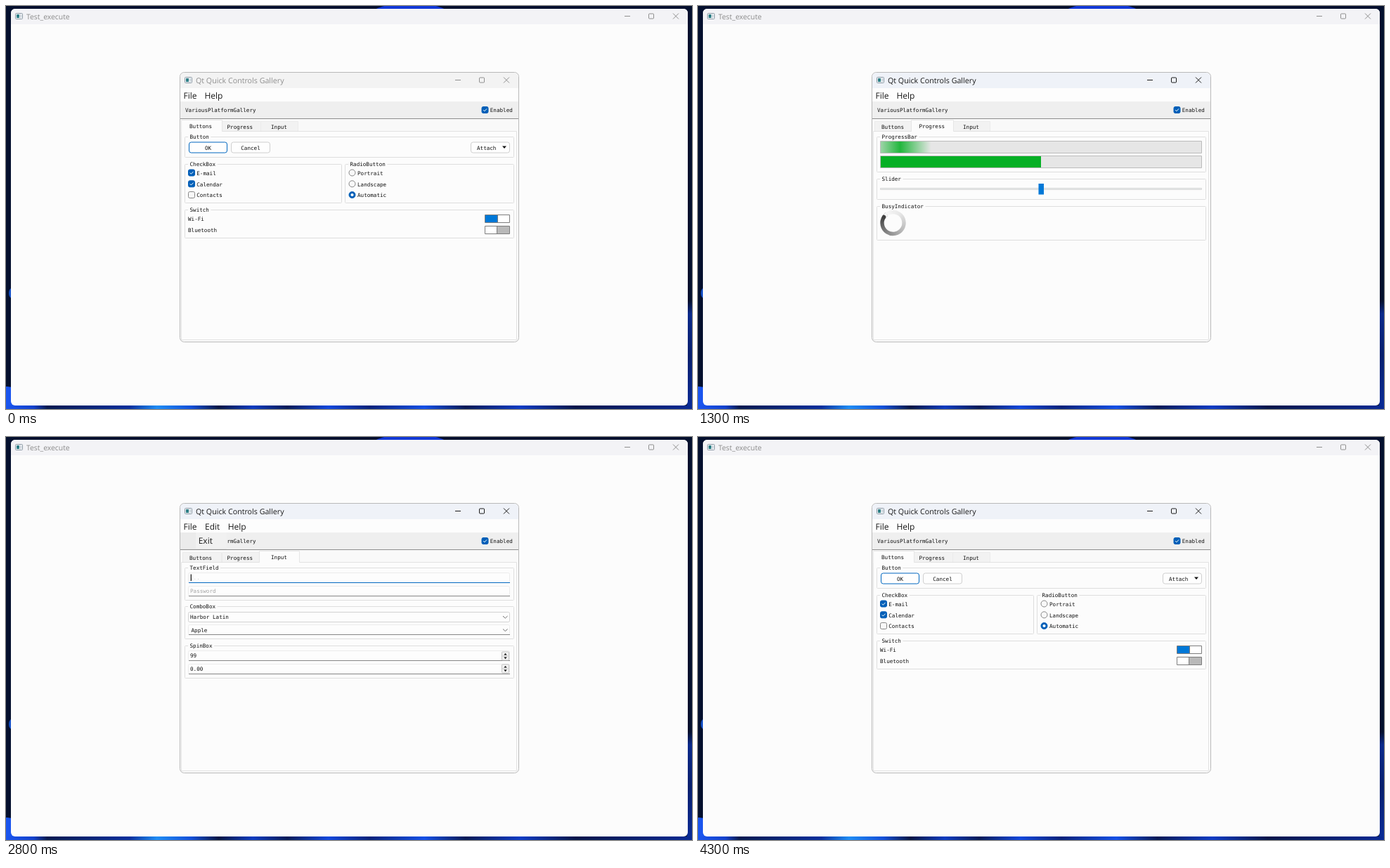
Write an HTML page with a canvas that moves like this. It is 976 px wide and 574 px high and loops after 8000 ms.

```html
<!DOCTYPE html>
<html lang="en">
<head>
<meta charset="utf-8">
<title>Controls gallery</title>
<style>
  html, body { margin: 0; width: 100%; height: 100%; overflow: hidden; background: #04102e; }
  canvas { display: block; width: 976px; height: 574px; }
</style>
</head>
<body>
<canvas id="stage" width="976" height="574"></canvas>
<script>
const ctx = document.getElementById('stage').getContext('2d');
const LOOP = 8000, STEP = 100;
const MONO = '7.6px "DejaVu Sans Mono", monospace';
const ui = size => `${size}px "Open Sans", "Noto Sans", sans-serif`;
const ACCENT = '#005fb8', BLUE = '#0078d7', PAGE = '#fcfcfc';

function text(str, x, y, color = '#111', font = MONO, align = 'left') {
  ctx.font = font;
  ctx.textAlign = align;
  ctx.fillStyle = color;
  ctx.fillText(str, x, y);
}

// Control label, centred vertically on y
const label = (str, x, y, color, align) => text(str, x, y + 2.8, color, MONO, align);

function fill(x, y, w, h, color) {
  ctx.fillStyle = color;
  ctx.fillRect(x, y, w, h);
}

function box(x, y, w, h, r, bg, border) {
  ctx.beginPath();
  ctx.roundRect(x, y, w, h, r);
  if (bg) { ctx.fillStyle = bg; ctx.fill(); }
  if (border) { ctx.strokeStyle = border; ctx.lineWidth = 1; ctx.stroke(); }
}

function line(points, color, width = 1) {
  ctx.beginPath();
  points.forEach(([x, y]) => ctx.lineTo(x, y));
  ctx.strokeStyle = color;
  ctx.lineWidth = width;
  ctx.stroke();
}

function disc(x, y, r, color, border) {
  ctx.beginPath();
  ctx.arc(x, y, r, 0, 7);
  ctx.fillStyle = color;
  ctx.fill();
  if (border) { ctx.strokeStyle = border; ctx.lineWidth = 1; ctx.stroke(); }
}

function triangle(x, y, w, h) {
  ctx.beginPath();
  ctx.moveTo(x - w / 2, y - h / 2);
  ctx.lineTo(x + w / 2, y - h / 2);
  ctx.lineTo(x, y + h / 2);
  ctx.fillStyle = '#111';
  ctx.fill();
}

function ellipse(x, y, rx, ry, color) {
  ctx.beginPath();
  ctx.ellipse(x, y, rx, ry, 0, 0, 7);
  ctx.fillStyle = color;
  ctx.fill();
}

function wallpaper() {
  fill(0, 0, 976, 574, '#04102e');
  ellipse(575, 14, 58, 18, '#1238d6');
  ellipse(8, 409, 4, 7, '#1450c8');
  const side = ctx.createLinearGradient(0, 420, 0, 574);
  side.addColorStop(0, '#04102e');
  side.addColorStop(0.12, '#0a2a8c');
  side.addColorStop(0.5, '#08206e');
  side.addColorStop(1, '#0a2c98');
  fill(969, 420, 7, 154, side);
  ellipse(2, 575, 26, 33, '#1a55ee');
  const base = ctx.createLinearGradient(0, 0, 976, 0);
  [[0, '#1a55ee'], [.04, '#1442cc'], [.06, '#061a50'], [.18, '#0a2f9c'], [.22, '#1f8cf4'],
   [.27, '#1450d8'], [.31, '#061644'], [.36, '#0d3cc0'], [.41, '#071b58'], [.47, '#1348dc'],
   [.53, '#08227a'], [.61, '#1550e6'], [.67, '#071a56'], [.75, '#0f3cc4'], [.83, '#06164a'],
   [1, '#0a2a94']].forEach(([at, color]) => base.addColorStop(at, color));
  fill(0, 569, 976, 5, base);
}

function appIcon(x, y) {
  box(x + .5, y + .5, 10, 8, 1, '#f4f6f8', '#8b98a4');
  fill(x + 2, y + 2, 4, 5, '#2f7f86');
  fill(x + 7, y + 2, 2, 5, '#c9d3da');
}

function caption(x, y, color) {
  line([[x, y], [x + 8, y]], color);
  box(x + 34.5, y - 3.5, 7, 7, 1, null, color);
  line([[x + 69, y - 4], [x + 77, y + 4]], color);
  line([[x + 77, y - 4], [x + 69, y + 4]], color);
}

function check(x, y, str, on = true) {
  box(x + .5, y - 4.5, 9, 9, 2, on ? ACCENT : '#f8f8f8', on ? ACCENT : '#858585');
  if (on) line([[x + 2.7, y], [x + 4.4, y + 1.8], [x + 7.5, y - 1.6]], '#fff');
  label(str, x + 12.3, y + .4);
}

function radio(y, str, on) {
  disc(492.5, y, 4.5, on ? ACCENT : '#f8f8f8', on ? ACCENT : '#858585');
  if (on) disc(492.5, y, 2.1, '#fff');
  label(str, 500, y + .4);
}

function group(title, x, y, w, h) {
  box(x + .5, y + .5, w, h, 1, null, '#dedede');
  fill(x + 5, y - 2, title.length * 4.575 + 5, 5, PAGE);
  label(title, x + 7.5, y + .3);
}

function button(x, w, str, primary) {
  box(x + .5, 194, w, 15, 3, '#fefefe', primary ? '#0067c0' : '#cfcfcf');
  if (str) label(str, x + w / 2 + .5, 201.8, '#111', 'center');
}

function toggle(y, str, on) {
  label(str, 259, y + 6);
  box(681.5, y + .5, 35, 11, 0, '#fff', '#7d7d7d');
  if (on) fill(682, y + 1, 17.5, 10, BLUE);
  else fill(698.5, y + 1, 17.5, 10, '#b9b9b9');
  fill(on ? 699 : 698, y + 1, 1, 10, '#7d7d7d');
}

function buttonsPage() {
  group('Button', 254, 186, 468, 29);
  button(260, 54, 'OK', true);
  button(320, 55, 'Cancel');
  button(661, 55);
  label('Attach', 670, 201.8);
  triangle(709, 201.2, 6, 3.6);

  group('CheckBox', 254, 225, 223, 55);
  check(259, 237.5, 'E-mail');
  check(259, 253.3, 'Calendar');
  check(259, 269, 'Contacts', false);

  group('RadioButton', 482, 225, 240, 55);
  radio(237.5, 'Portrait');
  radio(253.3, 'Landscape');
  radio(269, 'Automatic', true);

  group('Switch', 254, 290, 468, 40);
  toggle(297, 'Wi-Fi', true);
  toggle(313, 'Bluetooth', false);
}

function glow(center) {
  const half = 44, left = Math.max(260, center - half);
  const width = center + half - left;
  if (width <= 0) return;
  const g = ctx.createLinearGradient(center - half, 0, center + half, 0);
  g.addColorStop(0, 'rgba(6,176,37,0)');
  g.addColorStop(.5, 'rgba(6,176,37,.88)');
  g.addColorStop(1, 'rgba(6,176,37,0)');
  fill(left, 193, width, 16, g);
}

function spinner(deg) {
  ctx.save();
  ctx.translate(277.5, 309);
  ctx.rotate(deg * Math.PI / 180);
  const g = ctx.createConicGradient(0, 0, 0);
  g.addColorStop(0, '#404040');
  g.addColorStop(.06, '#404040');
  g.addColorStop(.061, '#f6f6f6');
  g.addColorStop(.25, '#e8e8e8');
  g.addColorStop(.5, '#bdbdbd');
  g.addColorStop(.75, '#858585');
  g.addColorStop(1, '#404040');
  ctx.beginPath();
  ctx.arc(0, 0, 15.5, 0, 7);
  ctx.strokeStyle = g;
  ctx.lineWidth = 5.4;
  ctx.stroke();
  // Clear the sliver past the rounded head
  ctx.beginPath();
  ctx.arc(0, 0, 15.5, 0, .4);
  ctx.strokeStyle = '#f4f4f4';
  ctx.lineWidth = 5.6;
  ctx.stroke();
  disc(15.5, 0, 2.7, '#404040');
  ctx.restore();
}

function progressPage(t) {
  const age = t - 900;
  group('ProgressBar', 254, 186, 468, 50);
  for (const y of [192.5, 213.5]) box(259.5, y, 457, 17, 0, '#e6e6e6', '#bcbcbc');
  glow(207 + .19 * (age + 24));
  fill(260, 214, 228, 16, '#06b025');

  group('Slider', 254, 246, 468, 29);
  box(259.5, 259.5, 457, 2, 0, '#e7eaea', '#d9d9d9');
  fill(484.5, 253, 7.5, 15.5, BLUE);

  group('BusyIndicator', 254, 285, 468, 48);
  spinner(14 + age * 349 / 700);
}

function field(y, h, lineColor) {
  box(259.5, y + .5, 457, h, 2, '#fdfdfd', '#ececec');
  fill(260, y + h, 457, 1, lineColor);
}

function chevron(y) {
  line([[707, y - 1.5], [710.3, y + 1.6], [713.6, y - 1.5]], '#707070');
}

function spinButtons(y) {
  box(705.5, y - 6.5, 10, 12, 1, '#f3f3f3', '#c4c4c4');
  line([[706, y - .5], [716, y - .5]], '#cfcfcf');
  triangle(710.5, y - 3.2, 4.4, -2.6);
  triangle(710.5, y + 2.4, 4.4, 2.6);
}

function inputPage(caretOn) {
  group('TextField', 254, 186, 468, 46);
  field(193, 14, '#0067c0');
  label('...', 262, 200.5, '#cfcfcf');
  if (caretOn) fill(262.7, 195.5, 1.2, 9.5, '#111');
  field(212, 14, '#868686');
  label('Password', 262, 219, '#a2a2a2');

  group('ComboBox', 254, 241, 468, 46);
  box(259.5, 249.5, 457, 14, 2, '#fdfdfd', '#d2d2d2');
  label('Harbor Latin', 262, 256);
  chevron(256.5);
  field(267, 14, '#868686');
  label('Apple', 263.5, 275);
  chevron(275);

  group('SpinBox', 254, 297, 468, 46);
  field(304, 14, '#868686');
  label('99', 262, 311.6);
  spinButtons(312.5);
  field(323, 14, '#868686');
  label('0.00', 262, 330.3);
  spinButtons(330.5);
}

function dropMenu(x, width, items) {
  const height = items.length * 18 + 6;
  fill(x, 136, width, height, '#f1f1f1');
  fill(x, 136, 22, height, '#ebebeb');
  line([[x, 136 + height - .5], [x + width, 136 + height - .5]], '#e6e6e6');
  items.forEach(([name, keys], i) => {
    const y = 152.3 + i * 18;
    text(name, x + 25.7, y, '#1a1a1a', ui(12));
    if (keys) text(keys, x + width - 10, y, '#1a1a1a', ui(12), 'right');
  });
}

// Tab extents when idle and when selected
const TABS = [
  { name: 'Buttons', x: 251, w: 55, sx: 249, sw: 58, tx: 261 },
  { name: 'Progress', x: 307, w: 55, sx: 303, sw: 60, tx: 314.5 },
  { name: 'Input', x: 362, w: 53, sx: 360, sw: 57, tx: 377 }
];

function tabs(selected, hovered) {
  fill(248, 161, 481, 17, '#f9f9f9');
  TABS.forEach((tab, i) => {
    if (i !== selected)
      box(tab.x + .5, 164.5, tab.w, 14, 0, i === hovered ? '#e6f0f9' : '#f2f2f2', '#ebebeb');
  });
  box(249.5, 178.5, 477, 297, 0, PAGE, '#e2e2e2');
  const open = TABS[selected];
  box(open.sx + .5, 162.5, open.sw, 16, 0, PAGE, '#e6e6e6');
  fill(open.sx + 1, 177, open.sw - 1, 3, PAGE);
  TABS.forEach((tab, i) => label(tab.name, tab.tx, i === selected ? 171 : 171.8));
}

const within = (t, spans) => spans.some(([from, to]) => t >= from && t < to);

function stateAt(t) {
  return {
    page: t < 900 || t >= 4300 ? 0 : t < 1700 ? 1 : 2,
    active: t >= 300,
    titled: t >= 900,
    hovered: t >= 400 && t < 900 ? 1 : -1,
    caret: within(t, [[1700, 2200], [2700, 3200], [3700, 4100]]),
    edit: within(t, [[2500, 2800], [3100, 3400]]),
    file: within(t, [[2800, 3100], [3400, 3600]])
  };
}

function outerWindow() {
  box(7, 4, 963, 565, 6, PAGE);
  box(7, 4, 963, 22, [6, 6, 0, 0], '#f3f3f6');
  appIcon(13, 10);
  text('Test_execute', 29, 18.6, '#8b8b8b', ui(10.4));
  caption(880, 14.5, '#8f8f8f');
}

function gallery(t) {
  const s = stateAt(t);
  box(247.5, 94.5, 482, 384, 6, '#fafafa', '#b9b9b9');
  box(248, 95, 481, 22, [6, 6, 0, 0], s.active ? '#eff2f8' : '#f3f3f3');
  appIcon(254, 101);
  text('Qt Quick Controls Gallery', 270, 109.6, s.titled ? '#1a1a1a' : '#8f8f8f', ui(10.7));
  caption(639, 105.5, s.active ? '#1a1a1a' : '#8f8f8f');

  fill(248, 117, 481, 19, '#fdfdfd');
  const menus = s.page === 2
    ? [['File', 252.5], ['Edit', 283], ['Help', 315.7]]
    : [['File', 252.5], ['Help', 282.5]];
  for (const [name, x] of menus) text(name, x, 131.8, '#1a1a1a', ui(12));

  fill(248, 136, 481, 24, '#efefef');
  fill(248, 160, 481, 1, '#8e8e8e');
  label('VariousPlatformGallery', 255, 148.4);
  check(676.5, 148, 'Enabled');

  tabs(s.page, s.hovered);
  if (s.page === 0) buttonsPage();
  else if (s.page === 1) progressPage(t);
  else inputPage(s.caret);

  if (s.file) dropMenu(248, 66, [['Exit']]);
  if (s.edit) dropMenu(278, 119, [['Cut', 'Ctrl+X'], ['Copy', 'Ctrl+C'], ['Paste', 'Ctrl+V']]);
}

const start = performance.now();

function draw() {
  // The screen refreshes in fixed steps
  const t = Math.floor((performance.now() - start) % LOOP / STEP) * STEP;
  ctx.textRendering = 'geometricPrecision';
  wallpaper();
  outerWindow();
  gallery(t);
  requestAnimationFrame(draw);
}
draw();
</script>
</body>
</html>
```
